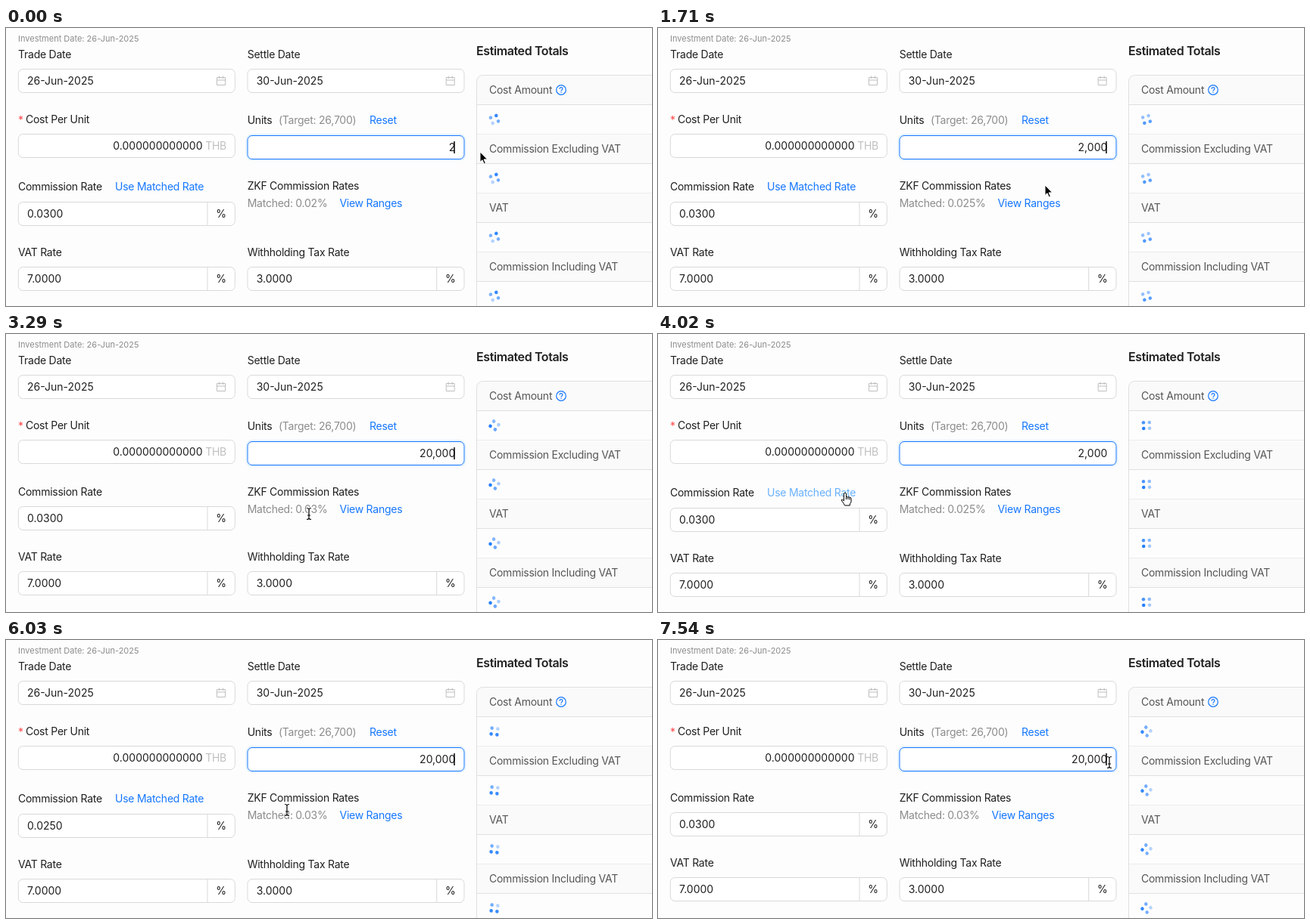
These frames come from a looping animation (853x368 px, 7560 ms). An HTML page:

```html
<!DOCTYPE html>
<html lang="en">
<head>
<meta charset="utf-8">
<title>Trade form</title>
<style>
html, body { margin: 0; width: 100%; height: 100%; overflow: hidden; background: #fdfdfd; }
svg { display: block; }
text { font: 14px Inter, sans-serif; letter-spacing: -.25px; fill: #1f1f1f; white-space: pre; }
.num { letter-spacing: 0; }
.soft { fill: #8c8c8c; }
.head { fill: #565656; }
.link { fill: #1677ff; }
.link.hover { fill: #69b1ff; }
.small { font-size: 11px; letter-spacing: 0; fill: #8c8c8c; }
.title { font-size: 16px; font-weight: 600; letter-spacing: -.4px; }
.box { fill: #fff; stroke: #d9d9d9; }
.line { fill: none; stroke: #e0e0e0; }
.icon { fill: none; stroke: #bfbfbf; }
.focus .box { stroke: #1677ff; }
.ring { fill: none; stroke: #0591ff; stroke-opacity: 0; stroke-width: 2; }
.focus .ring { stroke-opacity: .1; }
.dot { fill: #1677ff; }
</style>
</head>
<body>
<svg id="stage" width="853" height="368" viewBox="0 0 853 368"></svg>
<script>
const LOOP = 7560;
const stage = document.getElementById('stage');
const $ = id => document.getElementById(id);

const text = (x, y, s, cls = '', extra = '') =>
  `<text x="${x}" y="${y}" class="${cls}" ${extra}>${s}</text>`;
const END = 'text-anchor="end"', MID = 'text-anchor="middle"';
const box = (x, y) => `<rect class="box" x="${x}" y="${y + .5}" width="286" height="31" rx="6"/>`;

const dateField = (x, label, value) =>
  text(x, 40, label) + box(x + .3, 54) + text(x + 12, 75, value, 'num') +
  `<path class="icon" d="M${x + 262.5} 65.5h11v10h-11zM${x + 262.5} 69h11M${x + 265.5} 63.5v3.5M${x + 270.5} 63.5v3.5"/>`;

const percentField = (x, y, value, id) =>
  box(x + .3, y) + `<path class="line" style="stroke:#d9d9d9" d="M${x + 250} ${y + 1}v30"/>` +
  text(x + 12, y + 21, value, 'num', `id="${id}"`) + text(x + 268, y + 21, '%', '', MID);

const heads = ['Cost Amount', 'Commission Excluding VAT', 'VAT', 'Commission Including VAT'];
const panel = () => heads.map((s, i) => {
  const y = 62.5 + 78 * i;
  return `<rect x="622" y="${y}" width="240" height="39" fill="#fafafa" rx="${i ? 0 : 7}"/>` +
    `<path class="line" d="M622 ${y + 39}h240M622 ${y + 78}h240"/>` +
    text(638, y + 24.5, s, 'head') +
    `<g class="spin" transform="translate(645 ${y + 58.5})"><g>` +
    [[-1, -1], [1, -1], [1, 1], [-1, 1]].map(([a, b]) =>
      `<circle class="dot" cx="${a * 3.9}" cy="${b * 3.9}" r="2.3"/>`).join('') + '</g></g>';
}).join('');

stage.innerHTML =
  text(16, 18, 'Investment Date: 26-Jun-2025', 'small') +
  dateField(16, 'Trade Date', '26-Jun-2025') +
  dateField(318.7, 'Settle Date', '30-Jun-2025') +
  text(16, 127, '*', '', 'style="fill:#ff4d4f"') + text(26, 126, 'Cost Per Unit') +
  box(16.3, 140) + text(259.5, 161, '0.000000000000', 'num', END) +
  text(291, 161, 'THB', '', END + ' style="fill:#bfbfbf"') +
  text(318.7, 127, 'Units') + text(360, 127, '(Target: 26,700)', 'soft') + text(480, 127, 'Reset', 'link') +
  `<g id="units"><rect class="ring" x="317.5" y="141" width="289" height="34" rx="7.5"/>` + box(319, 142) +
  text(593.3, 163, '', 'num', END + ' id="amount"') +
  '<path id="caret" d="M592 150v16" stroke="#000" stroke-width="1.5"/></g>' +
  '<g id="rateLabel">' + text(16, 215, 'Commission Rate') + text(144, 215, 'Use Matched Rate', 'link', 'id="useRate"') + '</g>' +
  text(318.7, 214, 'ZKF Commission Rates') +
  text(318.7, 237, '<tspan id="matched"></tspan><tspan class="link" dx="16">View Ranges</tspan>', 'soft') +
  '<g id="lower">' + percentField(16, 230, '', 'rate') +
  text(16, 302, 'VAT Rate') + percentField(16, 316, '7.0000', 'vat') +
  text(318.7, 302, 'Withholding Tax Rate') + percentField(318.7, 316, '3.0000', 'tax') + '</g>' +
  text(621, 36, 'Estimated Totals', 'title') + panel() +
  '<path class="line" d="M621.5 368V70.5a8 8 0 0 1 8-8H860"/>' +
  '<circle cx="733" cy="82" r="6.3" fill="none" stroke="#1677ff" stroke-width="1.2"/>' +
  '<path d="M731 80.6q.1-2 2-2t2 1.7q0 1-1 1.6t-1 1.6M733 84.6v1.2" fill="none" stroke="#1677ff" stroke-width="1.2"/>' +
  `<g id="cursor">
    <path id="arrow" d="M0 0V13.4l3-2.7 2.2 5.1 2.1-.9-2.2-5H9.6z" stroke="#fff" stroke-width="1"/>
    <g id="beam" fill="none">${['#fff" stroke-width="3', '#000" stroke-width="1.2'].map(s =>
      `<path stroke="${s}" d="M-3-7.5Q-.5-7.5 0-6Q.5-7.5 3-7.5M0-6V6M-3 7.5Q-.5 7.5 0 6Q.5 7.5 3 7.5M-2 2h4"/>`).join('')}</g>
    <path id="hand" fill="#fff" stroke="#000" d="M-1.5 1Q0-.8 1.5 1V6q1.1-1.2 2.3 0q1.3-1 2.3.5q1.7-.6 2 1V11q0 2.5-1.8 4v2H-.4q-.8-2-4.4-7q.2-2 3.3.8zM1.5 6v3M3.8 6v3M6.1 6.5v3"/>
  </g>`;

// Value in force at time t from [start, value] steps.
const at = (steps, t) => steps.filter(s => s[0] <= t).pop()[1];

const amounts = [[0, '2'], [750, '20'], [1000, '200'], [1300, '2,000'], [2150, '20,000'], [3350, '2,000'], [5440, '20,000']];
const matches = [[0, .02], [1650, .025], [2330, .03], [3500, .025], [5560, .03]];
const rates = [[0, .03], [4300, .025], [6600, .03]];
const focuses = [[0, true], [4300, false], [4980, true], [6600, false], [7420, true]];
const carets = [...amounts.map(a => a[0]), 4980, 7420].sort((a, b) => a - b).map(k => [k, k]);
const path = [[0, 626, 164], [900, 626, 164], [1450, 511, 208], [1750, 511, 208], [2250, 400, 238],
  [3300, 400, 238], [3900, 247, 210], [4380, 247, 210], [4950, 592, 160], [5600, 592, 160],
  [6030, 371, 225], [6390, 251, 211], [6720, 251, 211], [7350, 596, 162], [LOOP, 596, 162]];

function pointer(t) {
  const i = path.findIndex(p => p[0] > t), [t0, x0, y0] = path[i - 1], [t1, x1, y1] = path[i];
  const u = (t - t0) / (t1 - t0), e = u * u * (3 - 2 * u);
  return [x0 + (x1 - x0) * e, y0 + (y1 - y0) * e];
}

const show = (id, on) => $(id).style.display = on ? '' : 'none';

function draw(t) {
  const match = at(matches, t), rate = at(rates, t), focus = at(focuses, t), differs = match !== rate;
  $('amount').textContent = at(amounts, t);
  $('matched').textContent = `Matched: ${match * 100 === 2.5 ? '0.025' : match.toFixed(2)}%`;
  $('rate').textContent = rate.toFixed(4);
  $('units').setAttribute('class', focus ? 'focus' : '');
  show('caret', focus && (t - at(carets, t)) % 1000 < 600);
  show('useRate', differs);
  $('rateLabel').setAttribute('transform', `translate(0 ${differs ? 0 : -1})`);
  $('lower').setAttribute('transform', `translate(0 ${differs ? 0 : -2})`);

  const [x, y] = pointer(t);
  const inside = (l, top, r, b) => x >= l && x <= r && y >= top && y <= b;
  const hover = differs && inside(144, 202, 262, 220);
  const beam = inside(319, 142, 605, 174) || inside(319, 200, 468, 245);
  $('useRate').setAttribute('class', hover ? 'link hover' : 'link');
  show('hand', hover);
  show('beam', beam);
  show('arrow', !hover && !beam);
  $('cursor').setAttribute('transform', `translate(${x} ${y})`);

  const angle = 90 * (.77 + t / 283), phase = t / 1887;
  for (const { firstChild: g } of document.querySelectorAll('.spin')) {
    g.setAttribute('transform', `rotate(${angle})`);
    [...g.children].forEach((dot, i) => {
      const d = phase - .09 - .2 * i, gap = Math.abs(d - Math.round(d));
      dot.setAttribute('opacity', 1 - 1.4 * gap);
    });
  }
}

const start = performance.now();
function tick() {
  draw((performance.now() - start) % LOOP);
  requestAnimationFrame(tick);
}
tick();
</script>
</body>
</html>
```
